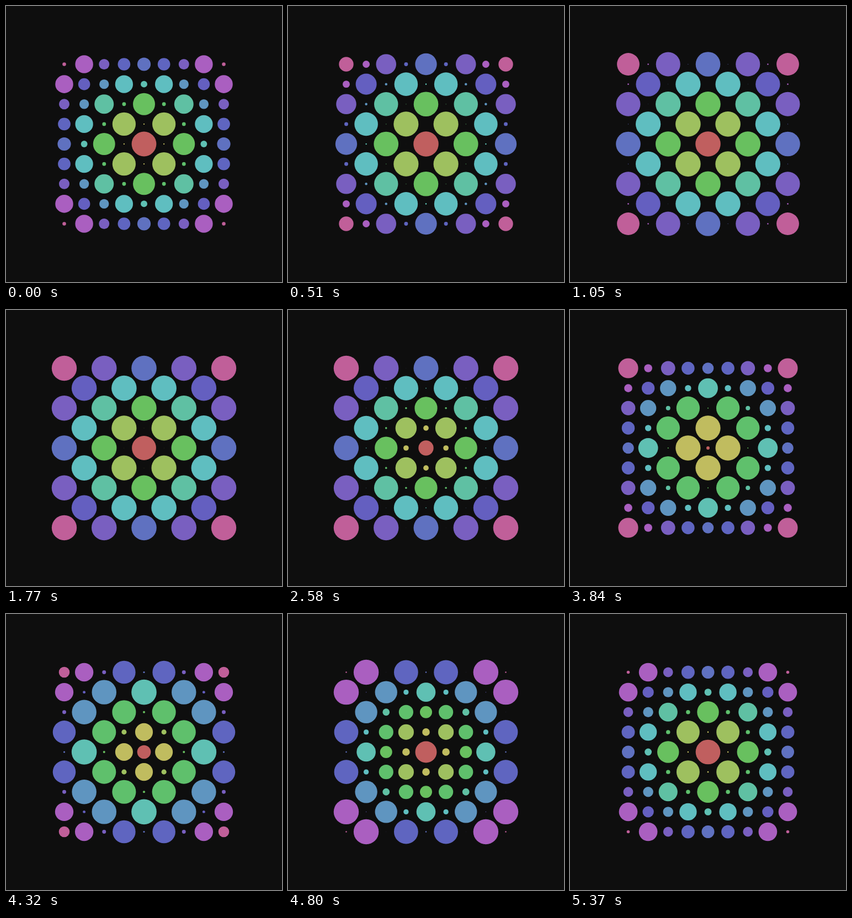
These frames come from a looping animation (500x500 px, 5400 ms). An HTML page with a canvas:

```html
<!DOCTYPE html>
<html lang="en">
<head>
<meta charset="utf-8">
<title>Dot ripple</title>
<style>
  html, body { margin: 0; width: 100%; height: 100%; overflow: hidden; background: #0e0e0e; }
  canvas { display: block; width: 500px; height: 500px; }
</style>
</head>
<body>
<canvas id="stage" width="500" height="500"></canvas>
<script>
  const ctx = document.getElementById('stage').getContext('2d');
  const LOOP = 5400, STEP = 30;
  const CENTER = 250, GAP = 36.125, MAX_R = 22.8;
  const SPAN = 19.8;    // grid units between ripples
  const START = 7.02;   // ripple radius at time zero
  const SPREAD = 12.05; // squared width of the ripple

  const dots = [];
  for (let y = -4; y <= 4; y++) {
    for (let x = -4; x <= 4; x++) {
      const dist = Math.hypot(x, y);
      dots.push({
        x: CENTER + x * GAP,
        y: CENTER + y * GAP,
        dist,
        odd: (x + y) % 2 !== 0,
        color: `hsl(${dist * 180 / Math.PI}, 43.5%, 56.3%)`
      });
    }
  }

  // Strength of the ripple at a given distance, 0 to 1
  function ripple(dist, front) {
    let gap = dist - front;
    gap -= SPAN * Math.round(gap / SPAN);
    return Math.exp(-gap * gap / SPREAD);
  }

  function draw(ms) {
    const time = Math.floor((ms % LOOP) / STEP) * STEP;
    const front = START + SPAN * time / LOOP;
    ctx.fillStyle = '#0e0e0e';
    ctx.fillRect(0, 0, 500, 500);
    for (const dot of dots) {
      const wave = ripple(dot.dist, front);
      ctx.fillStyle = dot.color;
      ctx.beginPath();
      ctx.arc(dot.x, dot.y, MAX_R * (dot.odd ? wave : 1 - wave), 0, 2 * Math.PI);
      ctx.fill();
    }
  }

  const begin = performance.now();
  function tick() {
    draw(performance.now() - begin);
    requestAnimationFrame(tick);
  }
  tick();
</script>
</body>
</html>
```
